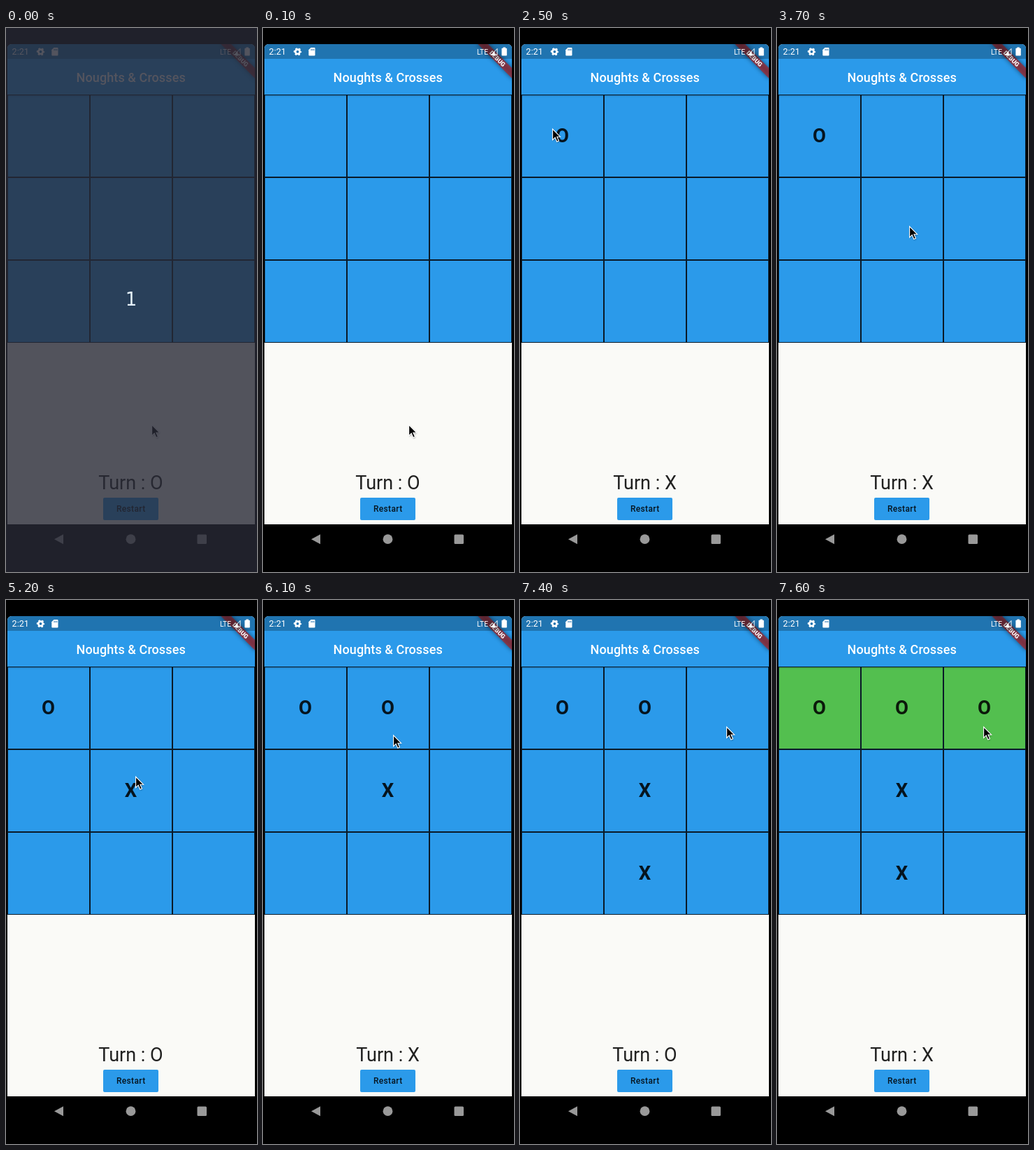
Animation, 359 px wide and 776 px high, one loop 8 s. Source, as an HTML page:

```html
<!DOCTYPE html>
<html lang="en">
<head>
<meta charset="utf-8">
<title>Noughts &amp; Crosses</title>
<style>
  html, body { margin: 0; width: 100%; height: 100%; overflow: hidden; background: #000; }
  svg { display: block; width: 100vw; height: 100vh; font-family: Roboto, sans-serif; }
  .mid { text-anchor: middle; }
  .ink { fill: #000; fill-opacity: .87; }
</style>
</head>
<body>
<svg viewBox="0 0 359 776">
  <defs>
    <clipPath id="screen"><path d="M2 708V29a6 6 0 0 1 6-6H350a6 6 0 0 1 6 6V708Z"/></clipPath>
    <filter id="blur" x="-30%" y="-150%" width="160%" height="400%"><feGaussianBlur stdDeviation="3"/></filter>
    <filter id="soft" x="-50%" y="-50%" width="200%" height="200%"><feGaussianBlur stdDeviation=".8"/></filter>
    <linearGradient id="drop" x2="0" y2="1">
      <stop stop-opacity=".22"/><stop offset="1" stop-opacity="0"/>
    </linearGradient>
  </defs>
  <rect width="359" height="776"/>

  <g clip-path="url(#screen)">
    <rect x="2" y="23" width="354" height="685" fill="#fafaf7"/>
    <g id="board"></g>
    <rect x="2" y="95" width="354" height="4" fill="url(#drop)"/>
    <rect x="2" y="23" width="354" height="72" fill="#2b9aea"/>
    <text class="mid" x="178.7" y="76.5" font-size="18" font-weight="500" letter-spacing=".1" fill="#fff">Noughts &amp; Crosses</text>
    <text id="turn" class="mid ink" x="178.5" y="658" font-size="27"></text>
    <rect x="139" y="670" width="79" height="32" rx="2" fill="#2b9aea"/>
    <text class="mid ink" x="178.7" y="690" font-size="12" font-weight="500" letter-spacing=".35">Restart</text>

    <g transform="translate(356 23) rotate(45)">
      <rect x="-35" y="24" width="70" height="10.4" opacity=".5" filter="url(#blur)"/>
      <rect x="-35" y="24" width="70" height="10.4" fill="#b71c1c" fill-opacity=".63"/>
      <text class="mid" y="32.3" font-size="8.8" font-weight="900" fill="#fff">DEBUG</text>
    </g>

    <rect x="2" y="23" width="354" height="21" opacity=".25"/>
    <g fill="#fff">
      <text x="8.6" y="38" font-size="12.6">2:21</text>
      <circle cx="49.5" cy="33.8" r="3.2" fill="none" stroke="#fff" stroke-width="2.6"/>
      <circle cx="49.5" cy="33.8" r="4.8" fill="none" stroke="#fff" stroke-width="1.8" stroke-dasharray="2.5 2.53" stroke-dashoffset="1.25"/>
      <path d="M68.5 28H73.5a1 1 0 0 1 1 1V38.5a1 1 0 0 1-1 1H66.3a1 1 0 0 1-1-1V31.3Z"/>
      <path d="M69 29.8v2.4M70.9 29.8v2.4M72.8 29.8v2.4" stroke="#2573ae" stroke-width=".9"/>
      <text x="306" y="37.6" font-size="10.2">LTE</text>
      <path d="M335 29.5V38.5H326.2Z" fill="none" stroke="#fff" stroke-width="1"/>
      <path d="M331.5 33V38.5H326.2Z"/>
      <path d="M343.4 27.5h3.4v1.2h1.2a.8.8 0 0 1 .8.8V38.7a.8.8 0 0 1-.8.8H342.2a.8.8 0 0 1-.8-.8V29.5a.8.8 0 0 1 .8-.8h1.2Z"/>
    </g>
  </g>

  <g fill="#999">
    <path d="M69 729.3L82 722.3V736.3Z"/>
    <circle cx="178.5" cy="729.2" r="6.9"/>
    <rect x="273.5" y="722.5" width="13.5" height="13.5" rx="1.5"/>
  </g>

  <g id="cursor">
    <path d="M1 2V18L4.6 14.6L7.3 20.4L10 19.2L7.4 13.6H12.4Z" opacity=".4" filter="url(#soft)"/>
    <path d="M.6 1.2V16.6L4.2 13.2L6.8 19.2L9.5 18L6.9 12.2H11.6Z" stroke="#fff" stroke-width="1.1"/>
  </g>

  <g id="countdown">
    <rect width="359" height="776" fill="#282a36" opacity=".8"/>
    <text class="mid" x="179" y="396" font-size="26" fill="#e6f2fc" font-family="DejaVu Sans, sans-serif">1</text>
  </g>
</svg>
<script>
const LOOP = 8000, TICK = 100, WIN_AT = 7600;
const BLUE = '#2b9aea', GREEN = '#53bf4f';

// time and cell of each turn, O first
const turns = [[2500, 0], [4600, 4], [5800, 1], [6800, 7], [7600, 2]];

// pointer moves: start, ticks, end x, end y
const moves = [
  [600, 1, 192, 526], [800, 5, 46, 143],
  [3100, 2, 134, 222], [3400, 2, 210, 288], [3600, 2, 189, 282],
  [4900, 2, 182, 265], [5200, 1, 185, 251], [5300, 3, 185, 161],
  [6100, 1, 186, 192], [6300, 5, 183, 367],
  [7100, 2, 294, 182], [7400, 1, 295, 180]
];

const $ = id => document.getElementById(id);
const smooth = p => p * p * (3 - 2 * p);

function add(tag, attrs) {
  const el = document.createElementNS('http://www.w3.org/2000/svg', tag);
  for (const key in attrs) el.setAttribute(key, attrs[key]);
  return $('board').appendChild(el);
}

const cells = Array.from({ length: 9 }, (_, i) => {
  const x = 2 + 118 * (i % 3), y = 95 + 118 * Math.floor(i / 3);
  const width = i % 3 === 2 ? 117 : 117;
  return {
    box: add('rect', { x: x + .5, y: y + .5, width, height: 117, stroke: '#0a1a28' }),
    mark: add('text', { x: x + 58.5, y: y + 68.3, class: 'mid ink', 'font-size': 27.5, 'font-weight': 700 })
  };
});

function pointer(t) {
  let x = 208, y = 565;
  for (const [start, ticks, toX, toY] of moves) {
    if (t < start) break;
    const done = Math.min(ticks, Math.floor((t - start) / TICK) + 1);
    const p = smooth(done / ticks);
    x += (toX - x) * p;
    y += (toY - y) * p;
  }
  return [x, y];
}

function draw(t) {
  const played = turns.filter(([at]) => t >= at);
  cells.forEach(({ box, mark }, i) => {
    const n = played.findIndex(([, cell]) => cell === i);
    mark.textContent = n < 0 ? '' : 'OX'[n % 2];
    box.setAttribute('fill', t >= WIN_AT && i < 3 ? GREEN : BLUE);
  });
  $('turn').textContent = 'Turn : ' + 'OX'[played.length % 2];
  $('cursor').setAttribute('transform', `translate(${pointer(t)})`);
  $('countdown').setAttribute('display', t < 100 ? 'inline' : 'none');
}

const begin = performance.now();
function frame() {
  draw((performance.now() - begin) % LOOP);
  requestAnimationFrame(frame);
}
frame();
</script>
</body>
</html>
```
